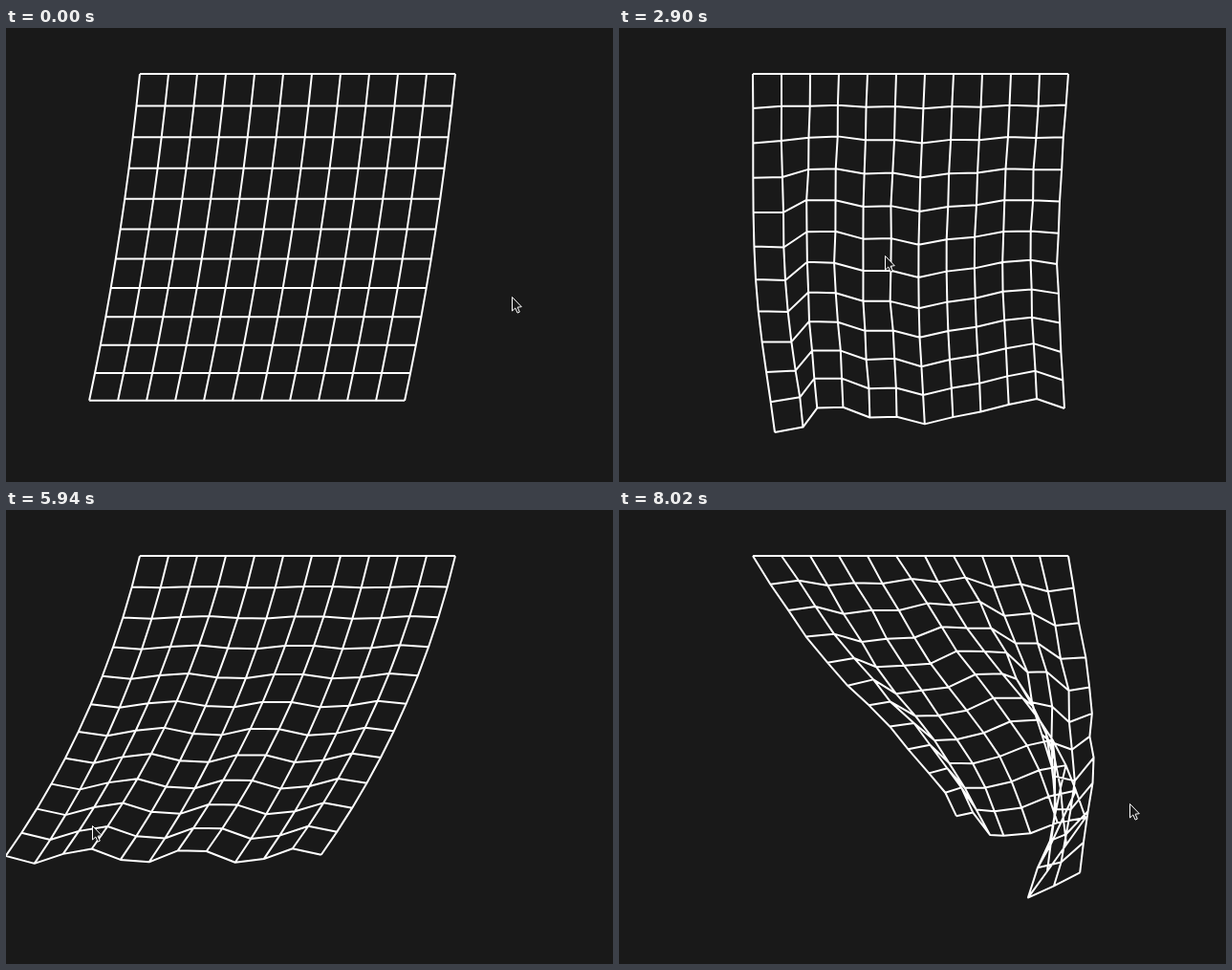
Write an HTML page with a canvas that moves like this. It is 635 px wide and 475 px high and loops after 8.09 s.

```html
<!DOCTYPE html>
<html lang="en">
<head>
<meta charset="utf-8">
<title>Cloth</title>
<style>
  html, body { margin: 0; width: 100%; height: 100%; overflow: hidden; background: #191919; }
  canvas { display: block; }
</style>
</head>
<body>
<canvas id="stage" width="635" height="475"></canvas>
<script>
const LOOP = 8090, STEP = 64.7, LAST = 124;
const N = 12, GAP = 30, DROP = 31.5, LEFT = 140, TOP = 48;
const ctx = document.getElementById('stage').getContext('2d');

const lerp = (a, b, u) => a + (b - a) * u;

// Repeatable noise in -1..1
const noise = i => {
  const s = Math.sin(i * 127.1 + 3.7) * 43758.5453;
  return 2 * (s - Math.floor(s)) - 1;
};

// Smooth curve through (xs, ys), uneven knots allowed
function spline(xs, ys, x) {
  const end = xs.length - 1;
  let i = 0;
  while (i < end - 1 && x > xs[i + 1]) i++;
  const slope = k => {
    const a = Math.max(k - 1, 0), b = Math.min(k + 1, end);
    return (ys[b] - ys[a]) / (xs[b] - xs[a]);
  };
  const h = xs[i + 1] - xs[i], u = (x - xs[i]) / h, v = 1 - u;
  return v * v * (1 + 2 * u) * ys[i] + u * u * (3 - 2 * u) * ys[i + 1]
    + h * u * v * (v * slope(i) - u * slope(i + 1));
}

// Where the cloth is squeezed sideways, the spare width turns into zigzag pleats
function pleat(pose) {
  return pose.map((v, k) => {
    const i = k >> 1, c = i % N;
    if (i < N) return v;
    const a = 2 * (c < N - 1 ? i : i - 1);
    const gap = Math.hypot(pose[a + 2] - pose[a], pose[a + 3] - pose[a + 1]);
    const spare = Math.sqrt(Math.max(0, GAP * GAP - gap * gap));
    return k % 2
      ? v + spare * (0.3 + 0.1 * noise(i)) * (c % 2 ? -1 : 1)
      : v + spare * 0.15 * noise(i + 500);
  });
}

// Cloth hung over a few guide points: curved down the rows, straight across the columns
function drape(cols, rows, guides) {
  const knots = [0, ...rows], pose = [];
  for (let r = 0; r < N; r++) {
    for (let c = 0; c < N; c++) {
      let j = 0;
      while (c > cols[j + 1]) j++;
      const u = (c - cols[j]) / (cols[j + 1] - cols[j]);
      for (const axis of [0, 1]) {
        const down = n => {
          const top = axis ? TOP : LEFT + GAP * cols[n];
          return spline(knots, [top, ...guides.map(g => g[2 * n + axis])], r);
        };
        pose.push(lerp(down(j), down(j + 1), u));
      }
    }
  }
  return pleat(pose);
}

// Sheet hanging at an angle that grows from a to b towards the hem
function swing(a, b, ripple = 0) {
  const pose = [];
  let dx = 0, y = TOP;
  for (let r = 0; r < N; r++) {
    for (let c = 0; c < N; c++) {
      pose.push(LEFT + GAP * c + dx, y + ripple * r / 11 * Math.sin(c * 1.7));
    }
    const angle = lerp(a, b, r / 10), len = 33.6 - 0.43 * r;
    dx += len * Math.sin(angle);
    y += len * Math.cos(angle);
  }
  return pose;
}

const pushed = drape([0, 5, 8, 11], [5, 8, 11], [
  [142, 213, 279, 205, 303, 200, 328, 180],
  [151, 305, 299, 301, 345, 285, 320, 252],
  [180, 389, 333, 386, 405, 345, 404, 297]
]);
const hanging = drape([0, 1, 2, 6, 10, 11], [6, 11], [
  [143, 263, 174, 264, 197, 243, 313, 260, 431, 241, 459, 249],
  [163, 423, 193, 420, 207, 395, 320, 414, 437, 388, 466, 398]
]);
const folded = drape([0, 3, 7, 11], [2, 5, 8, 11], [
  [200, 67, 265, 43, 406, 46, 490, 112],
  [297, 70, 358, 46, 448, 140, 511, 207],
  [374, 36, 428, 105, 472, 245, 546, 292],
  [428, 105, 455, 195, 488, 308, 587, 370]
]);
const knotted = drape([0, 4, 7, 11], [3, 6, 9, 11], [
  [164, 164, 279, 172, 332, 160, 432, 136],
  [194, 270, 288, 290, 322, 275, 381, 213],
  [259, 336, 314, 375, 318, 362, 340, 305],
  [312, 362, 306, 455, 366, 408, 322, 345]
]);
const trailing = drape([0, 2, 9, 11], [4, 8, 11], [
  [116, 187, 172, 172, 374, 186, 422, 216],
  [109, 315, 147, 290, 336, 334, 364, 360],
  [38, 362, 94, 353, 295, 424, 322, 434]
]);
const gathered = drape([0, 3, 6, 9, 11], [4, 8, 11], [
  [217, 155, 298, 165, 382, 143, 447, 176, 493, 190],
  [304, 245, 370, 266, 455, 238, 455, 320, 493, 292],
  [356, 313, 403, 343, 488, 322, 428, 406, 482, 380]
]);

// [step, pose]
const poses = [
  [0, swing(-0.105, -0.205)],
  [8, swing(0.02, 0.05)],
  [17, pushed],
  [24, swing(-0.12, -0.3, 8)],
  [33, swing(-0.3, -0.62, 8)],
  [45, hanging],
  [53, swing(0.3, 0.7, 6)],
  [58, swing(0.45, 0.85, 6)],
  [65, folded],
  [82, knotted],
  [92, swing(-0.25, -0.6, 8)],
  [102, trailing],
  [114, swing(0.15, 0.4, 6)],
  [124, gathered]
];
const times = poses.map(p => p[0]);

// [step, x, y] of the pointer tip
const pointer = [
  [0, 529, 281], [4, 522, 282], [17, 317, 231], [33, 40, 225], [45, 278, 238],
  [54, 580, 200], [65, 383, 72], [82, 328, 139], [92, 90, 330], [102, 336, 400],
  [113, 555, 370], [124, 534, 307]
];
const along = (k, n) => Math.round(spline(pointer.map(p => p[0]), pointer.map(p => p[k]), n));

const links = [];
for (let i = N; i < N * N; i++) {
  links.push([i - N, i, DROP]);
  if (i % N) links.push([i - 1, i, GAP]);
}

// Pull links towards their rest length; the top row is pinned
function relax(p, rounds) {
  while (rounds-- > 0) {
    for (const [a, b, rest] of links) {
      const dx = p[2 * b] - p[2 * a], dy = p[2 * b + 1] - p[2 * a + 1];
      const d = Math.max(Math.hypot(dx, dy), 4);
      const f = (d - rest) / d * (d > rest ? 0.45 : 0.12);
      const wa = a < N ? 0 : 1, wb = 2 - wa;
      p[2 * a] += dx * f * wa;
      p[2 * a + 1] += dy * f * wa;
      p[2 * b] -= dx * f * wb;
      p[2 * b + 1] -= dy * f * wb;
    }
  }
  return p;
}

function meshAt(n) {
  const mesh = poses[0][1].map((_, i) => spline(times, poses.map(p => p[1][i]), n));
  const away = Math.min(...times.map(t => Math.abs(t - n)));
  return relax(mesh, Math.min(away, 4) * 3);
}
const meshes = Array.from({ length: LAST + 1 }, (_, n) => meshAt(n));

const arrow = new Path2D('M0 0V14.5L3.3 11.5L5.6 16.6L7.8 15.6L5.6 10.7L9.8 10.2Z');

function thread(p, first, stride) {
  for (let j = 0; j < N; j++) {
    const k = 2 * (first + j * stride);
    ctx[j ? 'lineTo' : 'moveTo'](p[k], p[k + 1]);
  }
}

function draw(n) {
  ctx.fillStyle = '#191919';
  ctx.fillRect(0, 0, 635, 475);
  ctx.strokeStyle = '#fff';
  ctx.lineWidth = 2;
  ctx.lineJoin = 'round';
  ctx.beginPath();
  for (let i = 0; i < N; i++) {
    thread(meshes[n], i * N, 1);
    thread(meshes[n], i, N);
  }
  ctx.stroke();

  ctx.save();
  ctx.translate(along(1, n) + 0.5, along(2, n) + 0.5);
  ctx.lineWidth = 1;
  ctx.fill(arrow);
  ctx.stroke(arrow);
  ctx.restore();
}

function tick() {
  const t = performance.now() % LOOP;
  draw(Math.min(Math.floor((t + 20) / STEP), LAST));
  requestAnimationFrame(tick);
}
tick();
</script>
</body>
</html>
```
